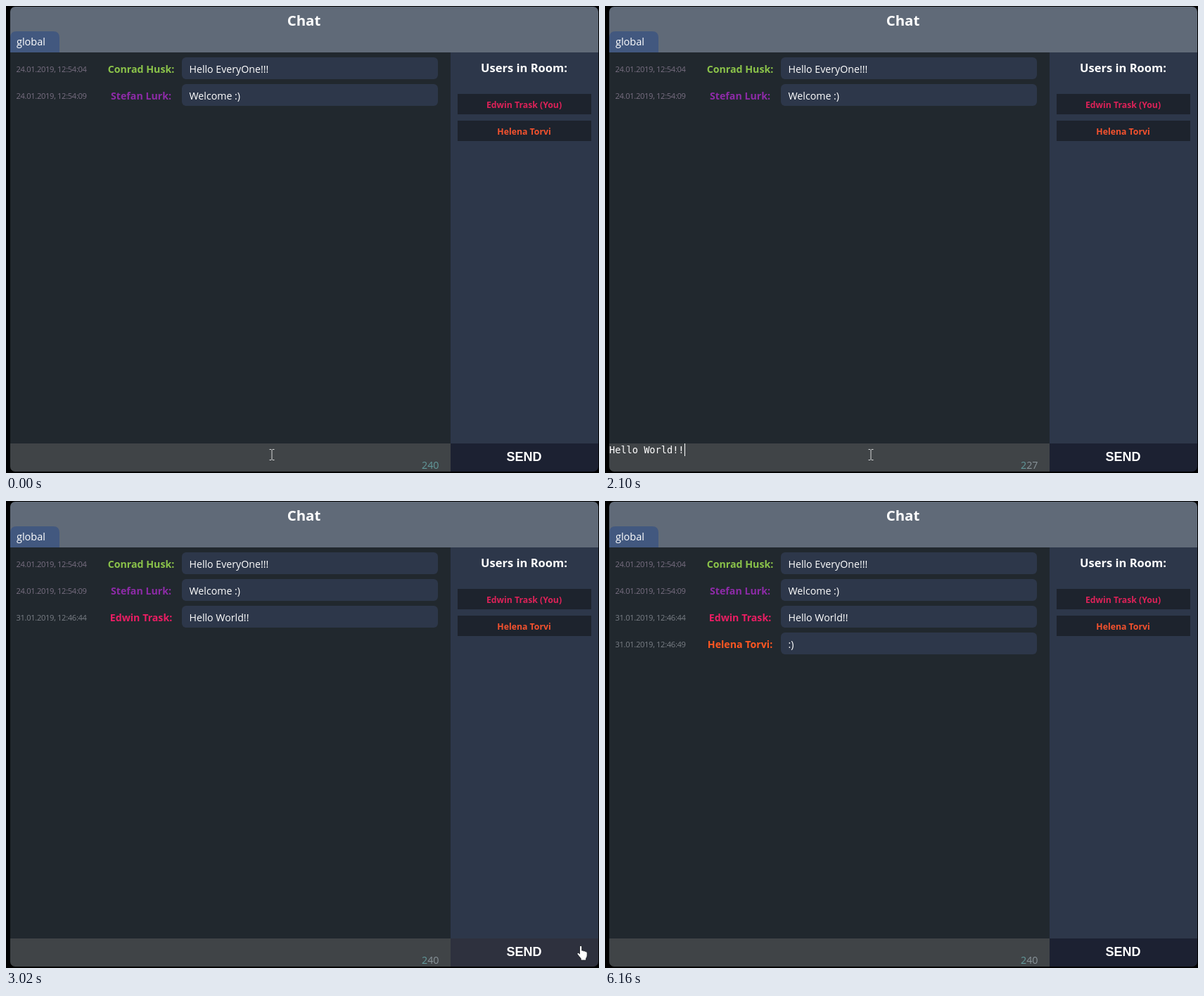
Recreate the animation shown at these times as an HTML page. Size 843 px wide and 664 px high, loop 8.24 s.

```html
<!DOCTYPE html>
<html lang="en">
<head>
<meta charset="utf-8">
<title>Chat</title>
<style>
  html, body { margin: 0; width: 100%; height: 100%; overflow: hidden; background: #000; }
  svg { display: block; font-family: "Open Sans", "Noto Sans", sans-serif; }
  text { white-space: pre; }
  .bold { font-weight: 700; }
  .mid { text-anchor: middle; }
  .time { font-size: 11.2px; letter-spacing: -.35px; }
  .msg { font-size: 14.2px; }
  .user { font-size: 12.25px; }
  .typed { font: 13.62px "DejaVu Sans Mono", monospace; }
  .send { font: 700 18px "Liberation Sans", Arial, sans-serif; }
</style>
</head>
<body>
<svg width="843" height="664" viewBox="0 0 843 664">
  <defs>
    <clipPath id="card"><rect x="6" y="1" width="836" height="661" rx="7"/></clipPath>
  </defs>
  <g clip-path="url(#card)">
    <rect x="6" y="1" width="836" height="65" fill="#606a78"/>
    <path d="M6 66V45q0-9 9-9H67q9 0 9 9V66z" fill="#42587f"/>
    <rect x="6" y="66" width="626" height="556" fill="#21282e"/>
    <rect x="632" y="66" width="210" height="556" fill="#2d374a"/>
    <rect x="6" y="622" width="626" height="40" fill="#404447"/>
    <rect id="button" x="632" y="622" width="210" height="40"/>
  </g>
  <g fill="#fff">
    <text class="bold mid" x="423.5" y="27.5" font-size="20.4">Chat</text>
    <text x="15" y="56" font-size="14.5">global</text>
    <text class="bold mid" x="736.5" y="93.5" font-size="16.5">Users in Room:</text>
    <text class="send mid" x="736.5" y="647">SEND</text>
    <text class="typed" id="typed" x="6" y="636"></text>
    <rect id="caret" y="622" width="1" height="18"/>
  </g>
  <g id="users"></g>
  <g id="log"></g>
  <text x="591" y="657.5" font-size="14.3" fill="#629a9c"><tspan>2</tspan><tspan id="count"></tspan></text>
  <path id="beam" d="M-3.5 -7.5H-1L0 -6.5L1 -7.5H3.5M0 -6.5V6.5M-3.5 7.5H-1L0 6.5L1 7.5H3.5"
        fill="none" stroke="#d4d6d7"/>
  <path id="hand" transform="translate(811 632)" fill="#fff" stroke="#14171f" stroke-width=".8" stroke-linejoin="round"
        d="M4.5 12V2q0-1.7 1.6-1.7T7.7 2V7.2q1.5-.8 2.6.7 1.6-.7 2.5.8 2.4-.5 2.4 1.9V14q0 2.6-1.6 4.3V21H6.2V18.6L1.3 12.4q-.8-1.5.5-2 1.2-.4 2.7 1.6z"/>
</svg>
<script>
const LOOP = 8240, SENT = 2380, REPLY = 6160;
const DRAFT = "Hello World!!";
const KEYS = [150, 330, 440, 560, 710, 840, 1020, 1200, 1300, 1450, 1650, 1920, 2100];
const CHAR = 8.2;
const $ = id => document.getElementById(id);

function add(parent, tag, attrs, text) {
  const el = document.createElementNS("http://www.w3.org/2000/svg", tag);
  for (const key in attrs) el.setAttribute(key, attrs[key]);
  if (text) el.textContent = text;
  return parent.appendChild(el);
}

function addUser(name, color, y) {
  add($("users"), "rect", { x: 642, y, width: 190, height: 29, fill: "#1d232d" });
  add($("users"), "text", { x: 736.5, y: y + 19.5, class: "user bold mid", fill: color }, name);
}

function addMessage([time, name, color, text, gray], i) {
  const row = add($("log"), "g", { transform: `translate(0 ${73 + 38 * i})` });
  add(row, "rect", { x: 250, width: 364, height: 31, rx: 6, fill: "#2d374a" });
  add(row, "text", { x: 14.5, y: 21, class: "time", fill: gray }, time);
  add(row, "text", { x: 192, y: 21.5, class: "msg bold mid", fill: color }, name + ":");
  add(row, "text", { x: 260.5, y: 21.5, class: "msg", fill: "#fff" }, text);
  return row;
}

addUser("Edwin Trask (You)", "#dc2258", 125);
addUser("Helena Torvi", "#f4522e", 163);
const rows = [
  ["24.01.2019, 12:54:04", "Conrad Husk", "#8bc34a", "Hello EveryOne!!!", "#796f82"],
  ["24.01.2019, 12:54:09", "Stefan Lurk", "#8e2ba8", "Welcome :)", "#796f82"],
  ["31.01.2019, 12:46:44", "Edwin Trask", "#e91e63", "Hello World!!", "#7a7f86"],
  ["31.01.2019, 12:46:49", "Helena Torvi", "#ff5722", ":)", "#7a7f86"]
].map(addMessage);

function show(el, on) {
  el.setAttribute("visibility", on ? "visible" : "hidden");
}

function draw(t) {
  const n = t < SENT ? KEYS.filter(k => k <= t).length : 0;
  const over = t >= 3020 && t < 3070;

  $("typed").textContent = DRAFT.slice(0, n);
  $("caret").setAttribute("x", Math.round(6 + CHAR * n));
  show($("caret"), (t >= KEYS[0] && t < 2890) || (t >= 3430 && t < 3910));

  $("count").textContent = 40 - n;
  $("count").setAttribute("fill", t < KEYS[0] ? "#629a9c" : "#89949a");

  show(rows[2], t >= SENT);
  show(rows[3], t >= REPLY);

  // The pointer leaves the input quickly and crosses the button.
  const x = t < 2890 ? 378 : t < 2950 ? 400 : 600;
  $("beam").setAttribute("transform", `translate(${x} 638)`);
  show($("beam"), t < 3020);
  show($("hand"), over);
  $("button").setAttribute("fill", over ? "#2e313e" : "#1c2132");
}

const start = performance.now();
function tick() {
  draw((performance.now() - start) % LOOP);
  requestAnimationFrame(tick);
}
tick();
</script>
</body>
</html>
```
